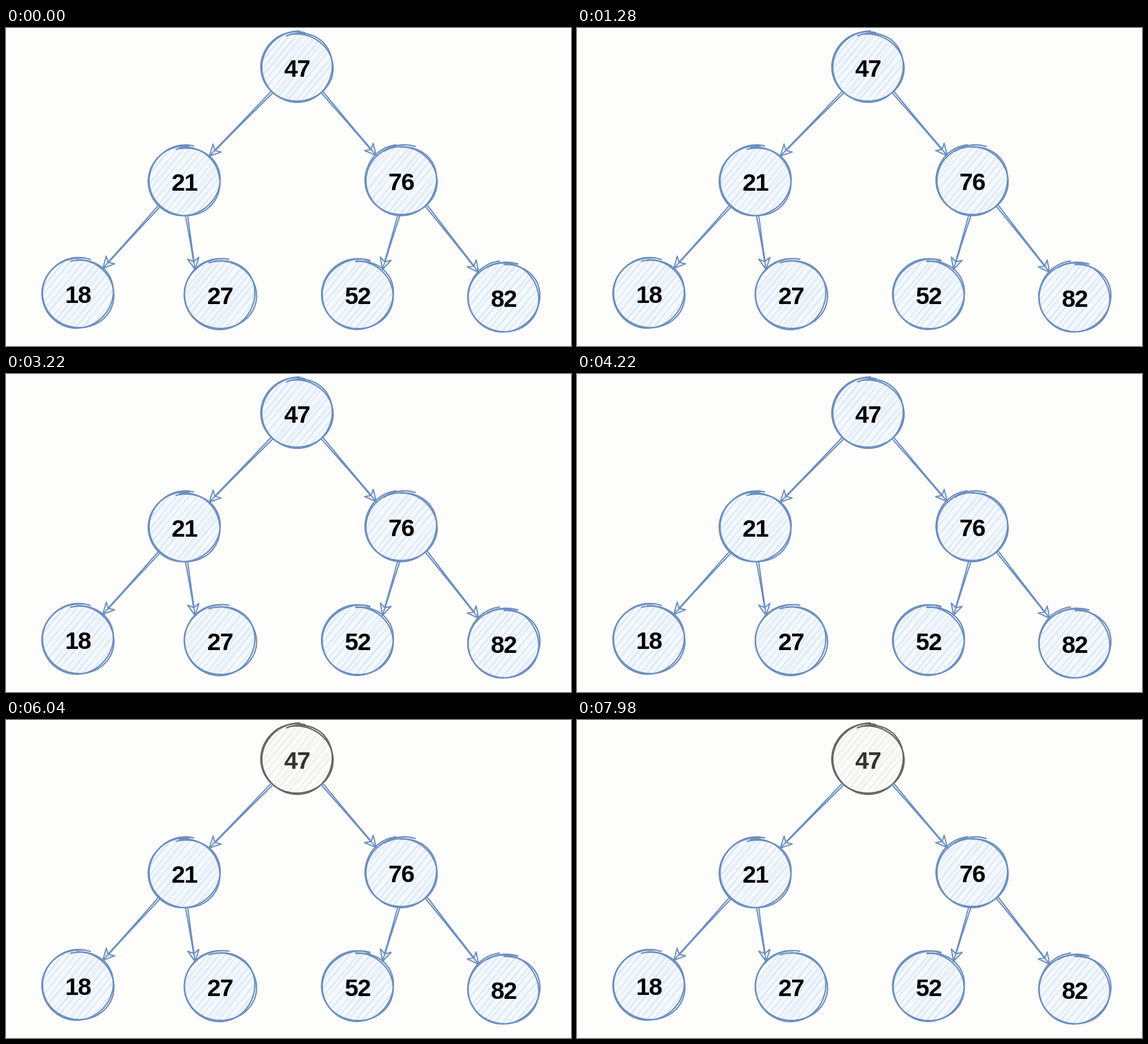
An HTML page with a canvas that plays this animation: 998x561 px, repeating every 8000 ms.

```html
<!DOCTYPE html>
<html lang="en">
<head>
<meta charset="utf-8">
<title>Binary search tree</title>
<style>
  html, body { margin: 0; width: 100%; height: 100%; overflow: hidden; background: #fdfdfb; }
  canvas { display: block; }
</style>
</head>
<body>
<canvas id="stage" width="998" height="561"></canvas>
<script>
const ctx = document.getElementById('stage').getContext('2d');
const LOOP = 8000, FADE_START = 5320, FADE_LENGTH = 160;
const RX = 63, RY = 61, CORNER = 44, TAU = Math.PI * 2;

const BLUE = { line: [108, 142, 191], hatch: [220, 233, 249], fill: [245, 249, 253], text: [0, 0, 0] };
const GREY = { line: [102, 102, 102], hatch: [238, 240, 238], fill: [251, 251, 248], text: [51, 51, 51] };

// Level order: the children of node i are 2i + 1 and 2i + 2.
const nodes = [
  { value: 47, x: 514, y: 69 },
  { value: 21, x: 315, y: 270 },
  { value: 76, x: 698, y: 269 },
  { value: 18, x: 127, y: 468 },
  { value: 27, x: 378, y: 470 },
  { value: 52, x: 621, y: 470 },
  { value: 82, x: 879, y: 475 },
];

const rgb = c => `rgb(${c.map(Math.round)})`;
const mixPalette = k => Object.fromEntries(Object.keys(BLUE).map(
  key => [key, rgb(BLUE[key].map((v, i) => v + (GREY[key][i] - v) * k))]));

function seeded(seed) {
  return () => {
    seed = (seed * 16807) % 2147483647;
    return seed / 2147483647;
  };
}

// One wobbly pen turn that starts near the top and overshoots its own start.
function penLoop(x, y, start, phase) {
  ctx.beginPath();
  for (let u = 0; u <= 1; u += 0.01) {
    const angle = start + u * (TAU + 0.45);
    const looseEnds = 0.04 * (Math.max(0, u * 6 - 5) - Math.max(0, 1 - u * 6));
    const r = 1 + 0.016 * Math.sin(2 * angle + phase) + 0.009 * Math.sin(3 * angle + phase) + looseEnds;
    ctx.lineTo(x + RX * r * Math.cos(angle), y + RY * r * Math.sin(angle));
  }
  ctx.stroke();
}

function drawNode({ value, x, y }, colors, random) {
  ctx.save();
  ctx.translate(x, y);
  ctx.beginPath();
  ctx.ellipse(0, 0, RX - 1, RY - 1, 0, 0, TAU);
  ctx.fillStyle = colors.fill;
  ctx.fill();
  ctx.clip();
  ctx.rotate(-0.88);
  ctx.strokeStyle = colors.hatch;
  ctx.lineWidth = 1.7;
  ctx.beginPath();
  for (let offset = -66; offset < 66; offset += 9) {
    for (let pass = 0; pass < 2; pass++) {
      ctx.moveTo(-70, offset + random() * 5);
      ctx.lineTo(70, offset + random() * 5);
    }
  }
  ctx.stroke();
  ctx.restore();

  ctx.strokeStyle = colors.line;
  ctx.lineWidth = 2.4;
  const phase = random() * TAU;
  for (const turn of [0, 1]) {
    penLoop(x + turn - 0.5, y, -2.1 + random() * 0.6, phase + turn * Math.PI);
  }

  ctx.fillStyle = colors.text;
  ctx.font = 'bold 43px "Liberation Sans", Arial, sans-serif';
  ctx.letterSpacing = '-1.5px';
  ctx.textAlign = 'center';
  ctx.fillText(value, x, y + 17);
}

// Wide edges leave from the lower corner, steep ones from the bottom.
function drawArrow(parent, child, colors) {
  const side = Math.sign(child.x - parent.x);
  const wide = Math.abs(child.x - parent.x) > 100;
  const x1 = parent.x + side * (wide ? CORNER : 4);
  const y1 = parent.y + (wide ? CORNER : RY);
  const x2 = child.x - side * CORNER;
  const y2 = child.y - CORNER;
  const length = Math.hypot(x2 - x1, y2 - y1);

  ctx.save();
  ctx.translate(x2, y2);
  ctx.rotate(Math.atan2(y2 - y1, x2 - x1));
  ctx.strokeStyle = colors.line;
  ctx.fillStyle = colors.fill;
  ctx.lineWidth = 2.2;
  ctx.beginPath();
  for (const stroke of [-1, 1]) {
    ctx.moveTo(-length, stroke * 2);
    ctx.quadraticCurveTo(-length / 2, stroke * 0.6, -14, stroke * 0.5);
  }
  ctx.stroke();
  ctx.beginPath();
  ctx.moveTo(0, 0);
  ctx.lineTo(-20, -10);
  ctx.lineTo(-14, 0);
  ctx.lineTo(-20, 10);
  ctx.closePath();
  ctx.fill();
  ctx.moveTo(-14, 0);
  ctx.lineTo(-4, 0);
  ctx.stroke();
  ctx.restore();
}

function draw(now) {
  const time = now % LOOP;
  const fade = Math.min(1, Math.max(0, (time - FADE_START) / FADE_LENGTH));
  const blue = mixPalette(0), root = mixPalette(fade);
  ctx.fillStyle = '#fdfdfb';
  ctx.fillRect(0, 0, 998, 561);
  ctx.lineCap = ctx.lineJoin = 'round';
  const random = seeded(911);
  nodes.forEach((node, i) => drawNode(node, i ? blue : root, random));
  nodes.slice(1).forEach((node, i) => drawArrow(nodes[i >> 1], node, blue));
}

const startTime = performance.now();
function tick() {
  draw(performance.now() - startTime);
  requestAnimationFrame(tick);
}
tick();
</script>
</body>
</html>
```
